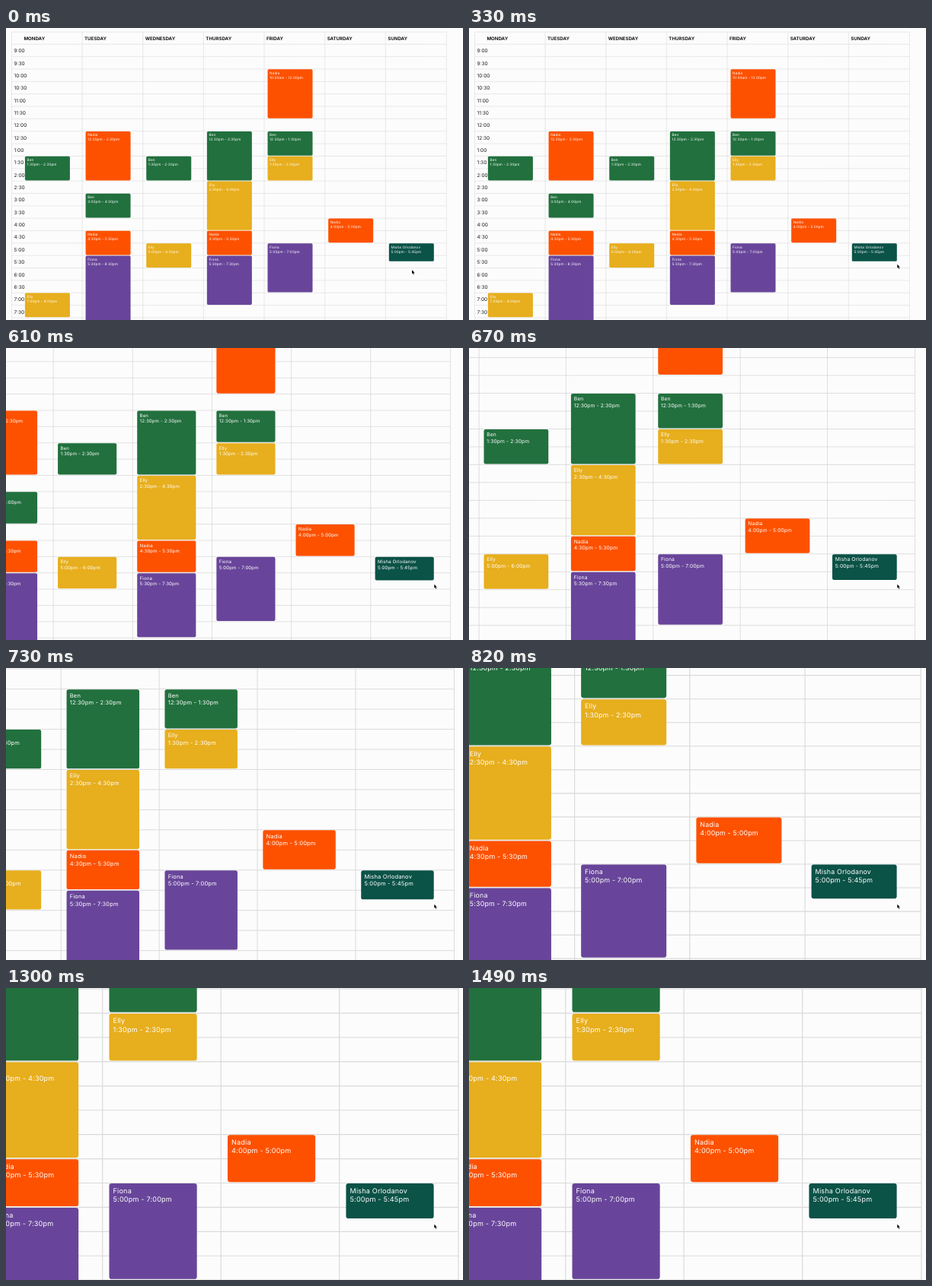
Recreate the animation shown at these times as an HTML page with a canvas. Size 600x384 px, loop 1.53 s.

```html
<!DOCTYPE html>
<html lang="en">
<head>
<meta charset="utf-8">
<title>Week calendar zoom</title>
<style>
  html, body { margin: 0; overflow: hidden; background: #fcfcfc; }
  canvas { display: block; width: 600px; height: 384px; }
</style>
</head>
<body>
<canvas id="stage" width="600" height="384"></canvas>
<script>
const ctx = document.getElementById('stage').getContext('2d');
const LOOP = 1530;
const LEFT = 7.5, RIGHT = 578.4, TOP = 5.2, GRID_TOP = 21.6;
const COL = 79.65, MONDAY = 20.4, HOUR = 32.7;
const FOCUS = { x: 562, y: 310.6 };
const DAYS = ['MONDAY', 'TUESDAY', 'WEDNESDAY', 'THURSDAY', 'FRIDAY', 'SATURDAY', 'SUNDAY'];

const PEOPLE = {
  nadia: ['Nadia', '#fd5100'],
  ben: ['Ben', '#22703e'],
  elly: ['Elly', '#e7ae1d'],
  fiona: ['Fiona', '#68459a'],
  misha: ['Misha Orlodanov', '#0b5247'],
};

// Per day: person, start hour, end hour
const SHIFTS = [
  [['ben', 13.5, 14.5], ['elly', 19, 20]],
  [['nadia', 12.5, 14.5], ['ben', 15, 16], ['nadia', 16.5, 17.5], ['fiona', 17.5, 20.5]],
  [['ben', 13.5, 14.5], ['elly', 17, 18]],
  [['ben', 12.5, 14.5], ['elly', 14.5, 16.5], ['nadia', 16.5, 17.5], ['fiona', 17.5, 19.5]],
  [['nadia', 10, 12], ['ben', 12.5, 13.5], ['elly', 13.5, 14.5], ['fiona', 17, 19]],
  [['nadia', 16, 17]],
  [['misha', 17, 17.75]],
];

// Time, zoom progress, slope
const ZOOM = [
  [350, 0, 0], [520, 0.281, 0.00215], [670, 0.62, 0.0024], [820, 0.9695, 0.001], [900, 1, 0],
];
const END_SCALE = 1.952;

const dayX = i => MONDAY + i * COL;
const hourY = h => GRID_TOP + (h - 9) * HOUR;
const clock = h => `${Math.floor(h - 0.01 + 0.01 - 1) % 12 + 1}:${String(h % 1 * 60).padStart(2, '0')}`;
const clock12 = h => clock(h) + (h < 12 ? 'am' : 'pm');

function hermite(knots, t) {
  if (t <= knots[0][0]) return knots[0][1];
  const i = knots.findIndex(k => k[0] > t);
  if (i < 0) return knots.at(-1)[1];
  const [t0, p0, m0] = knots[i - 1], [t1, p1, m1] = knots[i];
  const d = t1 - t0, u = (t - t0) / d, v = 1 - u;
  return v * v * ((1 + 2 * u) * p0 + u * d * m0) + u * u * ((3 - 2 * u) * p1 - v * d * m1);
}

// The visible area shrinks, so the eased value is 1 / scale
const scaleAt = t => 1 / (1 - (1 - 1 / END_SCALE) * hermite(ZOOM, t));

function text(str, x, y, size, color, weight = 400, spacing = 0) {
  ctx.font = `${weight} ${size}px Inter, sans-serif`;
  ctx.letterSpacing = spacing + 'px';
  ctx.fillStyle = color;
  ctx.fillText(str, x, y);
}

function line(x0, y0, x1, y1) {
  ctx.beginPath();
  ctx.moveTo(x0, y0);
  ctx.lineTo(x1, y1);
  ctx.stroke();
}

function drawGrid() {
  ctx.strokeStyle = '#dadada';
  ctx.lineWidth = 0.6;
  line(LEFT, TOP, RIGHT, TOP);
  line(LEFT, TOP, LEFT, 400);
  for (let i = 1; i < 7; i++) line(dayX(i), TOP, dayX(i), 400);
  line(RIGHT, TOP, RIGHT, 400);
  DAYS.forEach((day, i) => text(day, dayX(i) + 3, 15.5, 6.1, '#161616', 700));
  for (let h = 9; h < 20.5; h += 0.5) {
    const y = hourY(h);
    line(LEFT, y - 0.3, RIGHT, y - 0.3);
    text(clock(h), 10.6, y + 10.6, 6.5, '#222');
  }
}

function drawShift(day, [who, from, to]) {
  const [name, color] = PEOPLE[who];
  const x = dayX(day) + 4.5, y = hourY(from);
  ctx.fillStyle = color;
  ctx.beginPath();
  ctx.roundRect(x, y, 59, (to - from) * HOUR - 1, 1.6);
  ctx.fill();
  text(name, x + 2.6, y + 6.4, 4.65, '#fff', 400, 0.1);
  text(`${clock12(from)} - ${clock12(to)}`, x + 2.6, y + 12.3, 4.65, '#fff', 400, 0.1);
}

function drawCursor(t) {
  const u = Math.min(t / 300, 1), e = u * u * (3 - 2 * u);
  ctx.save();
  ctx.translate(533 + 29.3 * e, 318.2 - 7.4 * e);
  ctx.beginPath();
  [[0, 0], [0, 5], [1.1, 4], [2, 6], [2.9, 5.6], [2, 3.7], [3.5, 3.6]].forEach(p => ctx.lineTo(...p));
  ctx.closePath();
  ctx.strokeStyle = '#fff';
  ctx.lineWidth = 1;
  ctx.stroke();
  ctx.fillStyle = '#000';
  ctx.fill();
  ctx.restore();
}

function draw(t) {
  const s = scaleAt(t);
  ctx.setTransform(1, 0, 0, 1, 0, 0);
  ctx.fillStyle = '#fcfcfc';
  ctx.fillRect(0, 0, 600, 384);
  ctx.setTransform(s, 0, 0, s, FOCUS.x * (1 - s), FOCUS.y * (1 - s));
  ctx.textRendering = 'geometricPrecision';
  drawGrid();
  SHIFTS.forEach((list, day) => list.forEach(shift => drawShift(day, shift)));
  ctx.setTransform(1, 0, 0, 1, 0, 0);
  drawCursor(t);
}

const start = performance.now();
function tick() {
  draw((performance.now() - start) % LOOP);
  requestAnimationFrame(tick);
}
tick();
</script>
</body>
</html>
```
